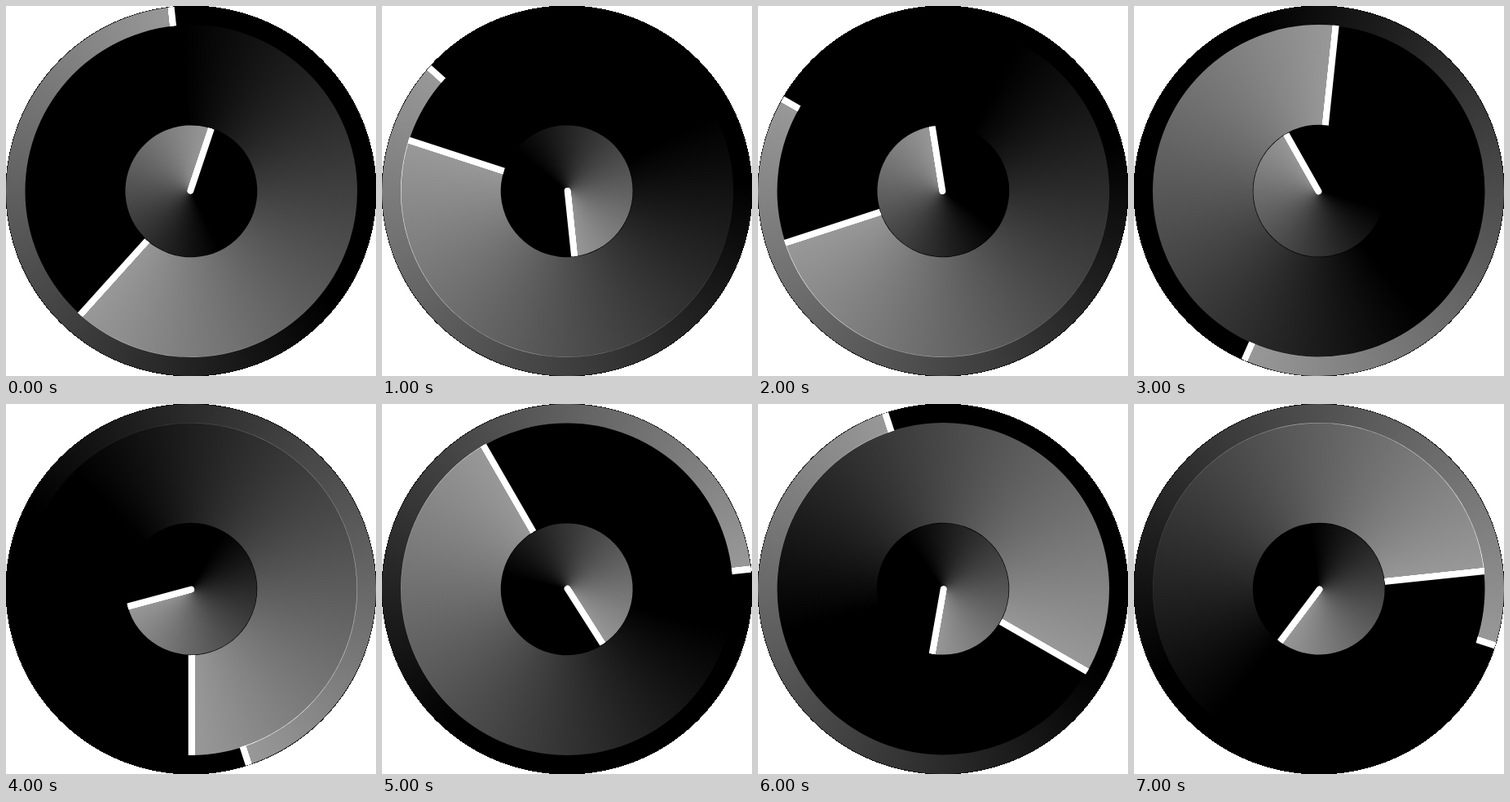
These frames come from a looping animation (454 by 454 pixels, 8 s). An HTML page with a canvas:

```html
<!DOCTYPE html>
<html lang="en">
<head>
<meta charset="utf-8">
<title>Radial clock</title>
<style>
  html, body { margin: 0; width: 100%; height: 100%; overflow: hidden; background: #fff; }
  canvas { display: block; }
</style>
</head>
<body>
<canvas width="454" height="454"></canvas>
<script>
const ctx = document.querySelector('canvas').getContext('2d');
const SIZE = 454, RADIUS = SIZE / 2, STEP = 1000;

// One clock time per second: hours, minutes, seconds.
const times = [
  [0, 37, 59], [5, 48, 52], [11, 42, 50], [11, 1, 34],
  [8, 30, 27], [4, 55, 14], [6, 20, 57], [7, 14, 18]
];

// Black disc with a hard pixel edge, built row by row.
function drawBase() {
  ctx.fillStyle = '#000';
  for (let y = 0; y < SIZE; y++) {
    const dy = y < RADIUS ? RADIUS - 1 - y : y - RADIUS;
    const half = Math.ceil(Math.sqrt(RADIUS ** 2 - dy ** 2));
    ctx.fillRect(RADIUS - half, y, 2 * half, 1);
  }
}

// A ring shaded up to its hand; light adds up where rings overlap.
function drawDial(degrees, inner, outer) {
  const shade = ctx.createConicGradient(0, 0, 0);
  shade.addColorStop(0, '#000');
  shade.addColorStop(0.375, '#000');
  shade.addColorStop(1, '#999');

  ctx.save();
  ctx.globalCompositeOperation = 'lighter';
  ctx.translate(RADIUS, RADIUS);
  ctx.rotate((degrees - 90) * Math.PI / 180);
  ctx.beginPath();
  ctx.arc(0, 0, outer, 0, 2 * Math.PI);
  ctx.arc(0, 0, inner, 0, 2 * Math.PI, true);
  ctx.fillStyle = shade;
  ctx.fill();
  ctx.clip();

  ctx.beginPath();
  ctx.moveTo(inner && inner - 4, -0.6);
  ctx.lineTo(outer + 4, -0.6);
  ctx.lineCap = 'round';
  ctx.lineWidth = 7.8;
  ctx.strokeStyle = '#fff';
  ctx.stroke();
  ctx.restore();
}

function draw() {
  const index = Math.floor(performance.now() / STEP) % times.length;
  const [hours, minutes, seconds] = times[index];
  ctx.clearRect(0, 0, SIZE, SIZE);
  drawBase();
  drawDial(seconds * 6, 203.5, RADIUS);
  drawDial(minutes * 6, 81.3, 204);
  drawDial(hours * 30 + minutes / 2, 0, 80.6);
  requestAnimationFrame(draw);
}
draw();
</script>
</body>
</html>
```
